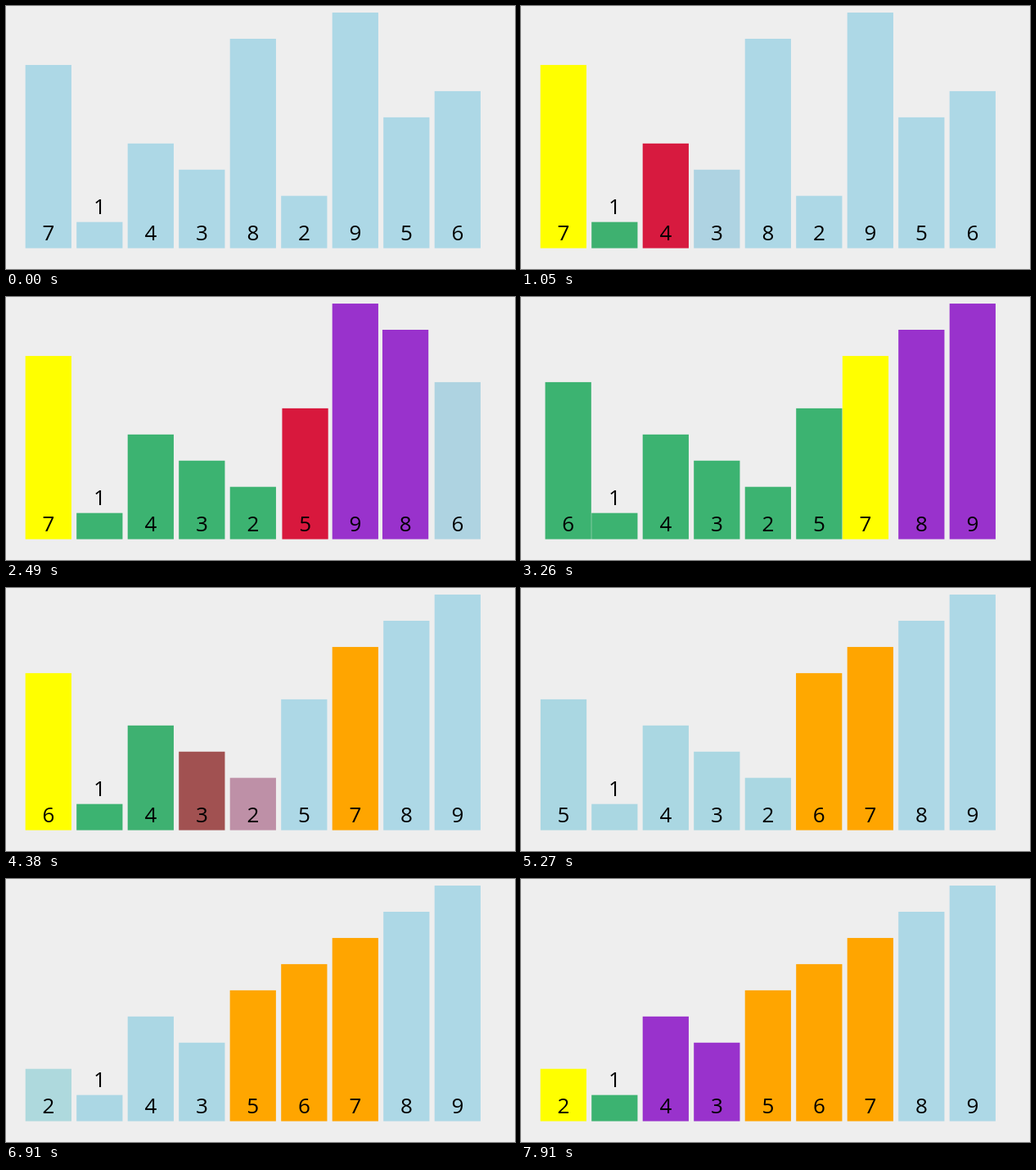
Write an HTML page that moves like this. It is 622 px wide and 321 px high and loops after 8000 ms.

```html
<!DOCTYPE html>
<html lang="en">
<head>
<meta charset="utf-8">
<title>Quick sort</title>
<style>
  html, body { margin: 0; width: 100%; height: 100%; overflow: hidden; background: #eee; }
  svg { display: block; width: 622px; height: 321px; }
  text { font: 26px "Open Sans", "Noto Sans", sans-serif; text-anchor: middle; }
</style>
</head>
<body>
<svg id="chart" viewBox="0 0 622 321"></svg>
<script>
const LOOP = 8000, TRANSITION = 238, LAST_STEP = 37;
const FIRST_TICK = 489, TICK = 110.7;         // the picture updates about nine times a second
const LEFT = 23.7, PITCH = 62.5, WIDTH = 56.25, BASE = 295.6, UNIT = 31.95;
const VALUES = [7, 1, 4, 3, 8, 2, 9, 5, 6];
const IDLE = [173, 216, 230], PIVOT = [255, 255, 0], CHECK = [220, 20, 60],
      LESS = [60, 179, 113], MORE = [153, 50, 204], SORTED = [255, 165, 0];

// Steps follow each other evenly, a little faster after the first pivot swap (step 14).
const stepTime = n => 3053 + (n - 14) * (n < 14 ? 205.5 : 200.5);
const ease = p => p < 0.5 ? 4 * p ** 3 : 1 - 4 * (1 - p) ** 3;

function sortSteps() {
  const order = VALUES.map((_, i) => i);      // bar standing in each slot
  const colors = VALUES.map(() => IDLE);      // colour of each bar
  const steps = [];
  const save = () => steps.push(VALUES.map((_, bar) => [order.indexOf(bar), ...colors[bar]]));
  const paint = (slot, color) => { colors[order[slot]] = color; };
  const swap = (a, b) => { [order[a], order[b]] = [order[b], order[a]]; save(); };

  save();
  let end = VALUES.length - 1;
  while (steps.length <= LAST_STEP) {
    const pivot = VALUES[order[0]];
    let store = 1;
    paint(0, PIVOT);
    save();
    for (let i = 1; i <= end; i++) {
      paint(i, CHECK);
      save();
      if (VALUES[order[i]] < pivot) {
        if (i !== store) swap(i, store);
        paint(store++, LESS);
      } else paint(i, MORE);
    }
    save();
    swap(0, store - 1);
    for (let i = 0; i <= end; i++) paint(i, IDLE);
    paint(store - 1, SORTED);
    save();
    end = store - 2;
  }
  return steps;
}

const steps = sortSteps();

// Each step starts from wherever the previous transition was cut off.
function poseAt(time) {
  let pose = steps[0];
  for (let n = 1; n <= LAST_STEP && stepTime(n) < time; n++) {
    const until = n < LAST_STEP ? Math.min(time, stepTime(n + 1)) : time;
    const k = ease(Math.min(1, (until - stepTime(n)) / TRANSITION));
    pose = pose.map((bar, b) => bar.map((v, j) => v + (steps[n][b][j] - v) * k));
  }
  return pose;
}

function add(parent, tag, attributes) {
  const node = document.createElementNS("http://www.w3.org/2000/svg", tag);
  for (const key in attributes) node.setAttribute(key, attributes[key]);
  return parent.appendChild(node);
}

const bars = VALUES.map(value => {
  const group = add(document.getElementById("chart"), "g", {});
  const height = UNIT * value;
  const rect = add(group, "rect", { y: BASE - height, width: WIDTH, height });
  const label = add(group, "text", { x: WIDTH / 2, y: value > 1 ? 286 : 254 });
  label.textContent = value;
  return { group, rect };
});

function draw() {
  const now = performance.now() % LOOP;
  const tick = Math.floor((now - FIRST_TICK) / TICK);
  const time = tick < 0 ? 0 : FIRST_TICK + tick * TICK;
  poseAt(time).forEach(([slot, ...rgb], b) => {
    bars[b].group.setAttribute("transform", `translate(${LEFT + PITCH * slot} 0)`);
    bars[b].rect.setAttribute("fill", `rgb(${rgb.map(Math.round)})`);
  });
  requestAnimationFrame(draw);
}
draw();
</script>
</body>
</html>
```
